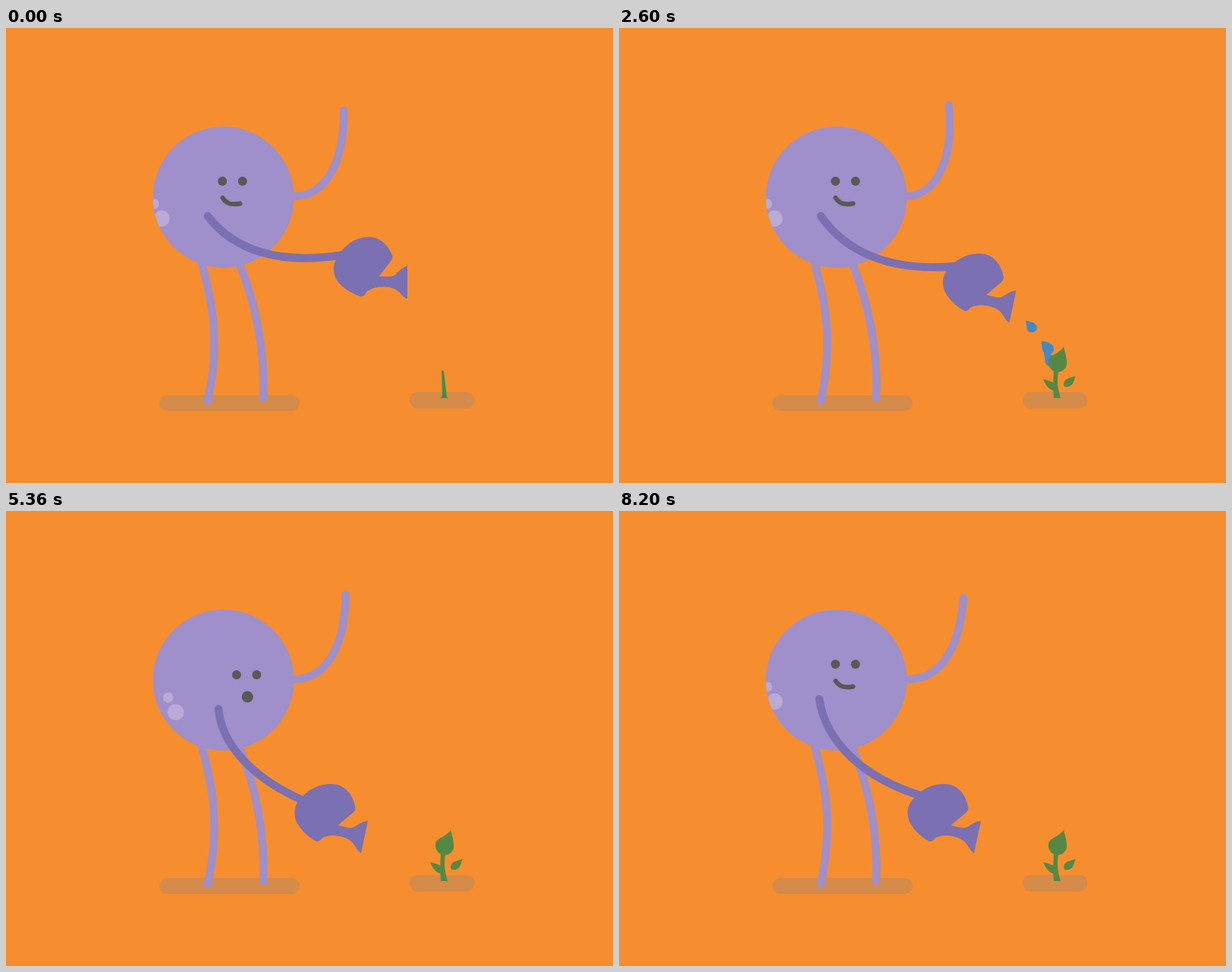
These frames come from a looping animation (800 by 600 pixels, 8.24 s). An HTML page with a canvas:

```html
<!DOCTYPE html>
<html lang="en">
<head>
<meta charset="utf-8">
<title>Watering a plant</title>
<style>
  html, body { margin: 0; width: 100%; height: 100%; overflow: hidden; background: #f68e2f; }
  canvas { display: block; }
</style>
</head>
<body>
<canvas id="stage" width="800" height="600"></canvas>
<script>
const LOOP = 8240;
const SKIN = '#9f8fca', DARK = '#7b70b2', INK = '#595957', GREEN = '#568845';
const ctx = document.getElementById('stage').getContext('2d');

const CAN = new Path2D('M432 320C440 310 452 298 474 297.5C496 297 505 316 507 329Q507 332 504 335L484 352C494 354 500 357 506 354C512 350 516 347 523.5 346L514.5 388.5C508 386 509 379 500 372C488 364 470 364 463 369Q460 374 455 373C446 368 428 354 427 338Q426 328 432 320Z');
const DROP = new Path2D('M-9-10C2-9 8-5 8 1A8 8 0 0 1-7 3C-8-2-8-6-9-10Z');
const SPROUT = new Path2D('M574 452Q575.5 450.5 577 453L581 486L582 488L572 488L575 486Z');
const STEM = new Path2D('M573 452L579 452C577 465 578 475 582 488L573 488L572 474Z');
const BUD = new Path2D('M586 420.5C588 428 591 438 590 444C589 450 583 454 577 454C570 453 565 446 566 439C567 431 580 430 586 420.5Z');
const LEAF_L = new Path2D('M559 463C567 465 572 467 574 469L574 479C565 476 562 470 559 463Z');
const LEAF_R = new Path2D('M602 459C595 461 587 462 586 469Q586 472 588 473Q595 474 598 469C600 465 600 462 602 459Z');

// Watering arm poses as cubic curves: level, pouring, lowered, at rest
const LEVEL = [266, 248, 300, 293, 360, 313, 445, 299];
const POUR = [266, 248, 300, 297, 360, 322, 445, 314];
const LOW = [280, 261, 284, 305, 320, 350, 392, 382];
const REST = [264, 248, 272, 303, 320, 352, 400, 376];

// Waving hand: [time, cycles]
const WAVE = [[0, 0], [1000, 1], [2600, 2.75], [4360, 4.46], [5360, 5.46], [6600, 6.97], [8240, 8.37]];

const clamp = v => Math.max(0, Math.min(1, v));
const span = (t, from, to) => clamp((t - from) / (to - from));
const ease = v => (1 - Math.cos(Math.PI * v)) / 2;
const mix = (a, b, k) => a + (b - a) * k;
const mixAll = (a, b, k) => a.map((v, i) => mix(v, b[i], k));

function disc(x, y, r, color) {
  ctx.fillStyle = color;
  ctx.beginPath();
  ctx.arc(x, y, r, 0, 7);
  ctx.fill();
}

function limb([x, y, ...rest], color) {
  ctx.strokeStyle = color;
  ctx.lineWidth = 10.5;
  ctx.beginPath();
  ctx.moveTo(x, y);
  ctx.bezierCurveTo(...rest);
  ctx.stroke();
}

function shadow(x, y, w, h) {
  ctx.fillStyle = '#d58b49';
  ctx.beginPath();
  ctx.roundRect(x, y, w, h, h / 2);
  ctx.fill();
}

// Fills a path scaled about a point
function grown(path, x, y, sx, sy) {
  if (sx <= 0 || sy <= 0) return;
  ctx.save();
  ctx.translate(x, y);
  ctx.scale(sx, sy);
  ctx.translate(-x, -y);
  ctx.fill(path);
  ctx.restore();
}

function waveArm(t) {
  const i = WAVE.findIndex(k => k[0] > t);
  const [t0, c0] = WAVE[i - 1], [t1, c1] = WAVE[i];
  const s = Math.sin(2 * Math.PI * mix(c0, c1, span(t, t0, t1)));
  limb([379, 222, 424 + 5 * s, 222 + s, 446 + 4 * s, 172 + 2 * s, 445 + 10.5 * s, 108.7 + 6.7 * s], SKIN);
}

function face(k, open) {
  ctx.save();
  ctx.beginPath();
  ctx.arc(286.5, 223, 93, 0, 7);
  ctx.clip();
  ctx.translate(18.7 * k, 14 * k);
  disc(195, 232, 6.8, '#b9abd6');
  disc(205, 251.3, 10.7, '#b9abd6');
  disc(285.2, 202, 6, INK);
  disc(311.7, 202, 6, INK);
  const [x0, y0, cx, cy, x1, y1] = mixAll([285.5, 224, 292, 235, 308.5, 231.5], [299.5, 231, 299.5, 231, 299.6, 231], open);
  ctx.strokeStyle = INK;
  ctx.lineWidth = mix(6, 15, open);
  ctx.beginPath();
  ctx.moveTo(x0, y0);
  ctx.quadraticCurveTo(cx, cy, x1, y1);
  ctx.stroke();
  ctx.restore();
}

function drops(t) {
  ctx.fillStyle = '#4289c7';
  for (let i = 0; i < 11; i++) {
    const v = (t - 718 - 197 * i) * 0.00175;
    if (v <= 0 || v >= 1) continue;
    const p = Math.sin(v * Math.PI / 2), q = 1 - p;
    const size = Math.min(1, v * 7) * Math.min(1, 0.8 + 0.4 * v);
    ctx.save();
    ctx.translate(q * q * 519 + 2 * p * q * 568 + p * p * 569, q * q * 378 + 2 * p * q * 405 + p * p * 440);
    ctx.scale(size, size);
    ctx.fill(DROP);
    ctx.restore();
  }
}

function plant(t) {
  const bud = ease(span(t, 1200, 1740)), leaf = ease(span(t, 1740, 2320));
  ctx.fillStyle = '#438d49';
  if (bud < 1) ctx.fill(SPROUT);
  ctx.fillStyle = GREEN;
  grown(STEM, 577, 488, bud, 1);
  grown(BUD, 577, 454, bud, bud);
  grown(LEAF_L, 574, 476, leaf, leaf);
  grown(LEAF_R, 586, 473, leaf, leaf);
}

function can(tilt, lower) {
  ctx.save();
  ctx.translate(519 + 10 * (1 - tilt) - 46.5 * lower, 367 - 32 * (1 - tilt) + 62.5 * lower);
  ctx.rotate(-12 * (1 - tilt) * Math.PI / 180);
  ctx.translate(-519, -367);
  ctx.fillStyle = DARK;
  ctx.fill(CAN);
  ctx.restore();
}

function draw(t) {
  const tilt = ease(span(t, 340, 920));
  const lower = ease(span(t, 4040, 4620));
  const back = ease(span(t, 6240, 6820));
  const look = lower - back;

  ctx.fillStyle = '#f68e2f';
  ctx.fillRect(0, 0, 800, 600);
  ctx.lineCap = 'round';
  shadow(202, 484, 185, 21);
  shadow(532, 480, 85.5, 21.7);
  limb([258, 310, 273, 365, 282, 415, 266, 492], SKIN);
  limb([308, 312, 328, 360, 342, 425, 339, 488], SKIN);
  waveArm(t);
  disc(286.5, 223, 93, SKIN);
  face(look, clamp((look - 0.6) / 0.3));
  drops(t);
  plant(t);
  limb(mixAll(mixAll(mixAll(LEVEL, POUR, tilt), LOW, lower), REST, back), DARK);
  can(tilt, lower);
}

const start = performance.now();
function tick() {
  draw((performance.now() - start) % LOOP);
  requestAnimationFrame(tick);
}
tick();
</script>
</body>
</html>
```
